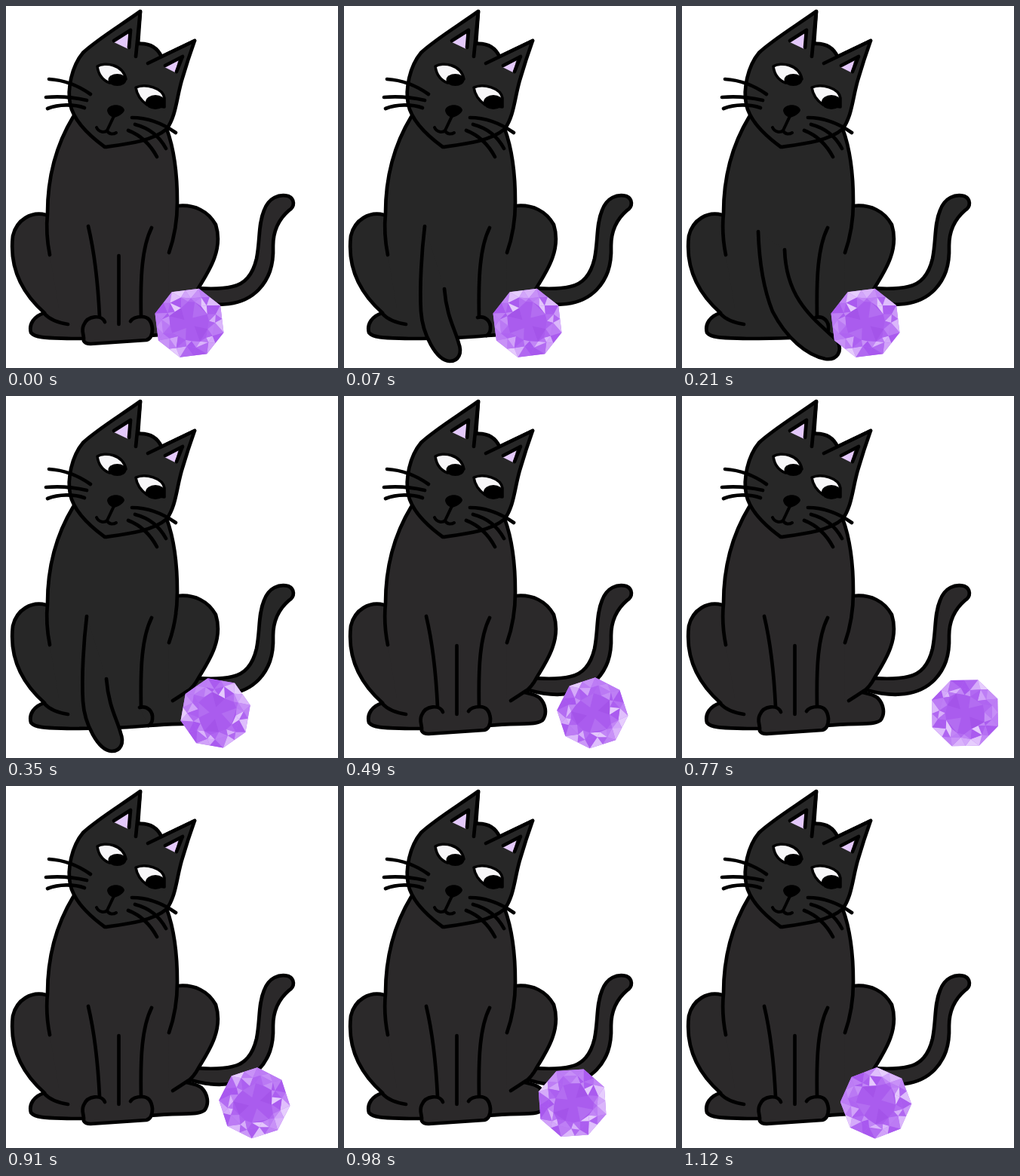
An HTML page for the animation above (1190 ms loop, 440x480 px).

```html
<!DOCTYPE html>
<html lang="en">
<head>
<meta charset="utf-8">
<title>Cat and gem</title>
<style>
html, body { margin: 0; width: 100%; height: 100%; overflow: hidden; background: #fff; }
svg { display: block; width: 440px; height: 480px; }
#cat { fill: #2b292a; stroke: #000; stroke-width: 4.7; stroke-linecap: round; stroke-linejoin: round; }
#cat.swing { fill: #272727; }
#cat.swing #rest, #cat:not(.swing) #reach { display: none; }
.line { fill: none; }
.flat { stroke: none; }
</style>
</head>
<body>
<svg viewBox="0 0 440 480">
  <g id="cat">
    <!-- tail -->
    <path d="M245 374C262 374 280 377 300 372C320 368 328 352 332 335C337 310 334 290 342 271C348 254 362 249 374 252C383 256 383 266 375 271C360 284 354 300 354 318C355 345 348 362 335 376C314 398 280 400 245 390"/>
    <!-- haunches and feet -->
    <path d="M53 277C34 272 14 283 9 305C5 340 16 376 51 407C37 411 30 422 33 433C39 441 60 440 86 441C130 441 160 440 190 437C235 433 254 437 263 430C270 421 267 408 259 400C254 396 248 395 239 393C246 388 252 380 255 374C270 350 288 322 278 290C268 272 250 263 228 265"/>
    <path class="line" d="M51 408C58 416 70 420 82 422M221 404Q232 397 241 391"/>
    <!-- torso -->
    <path class="flat" d="M90 147C70 180 55 220 55 275C53 295 55 315 58 330L70 400L215 400L216 327C222 310 227 285 227 260C227 225 223 190 213 163Z"/>
    <path class="line" d="M89 147C69 180 55 220 55 275C53 295 55 315 58 330M213 163C223 190 227 225 227 260C227 285 222 310 216 327M193 294C180 320 178 360 179 412"/>
    <g id="rest">
      <path class="line" d="M109 292C118 330 122 370 124 412"/>
      <path d="M131 419C127 409 108 410 103 423C99 431 104 436 103 444Q105 448 112 448L186 443C193 441 194 434 194 428C193 417 188 412 180 412Q169 412 165 418"/>
      <path class="line" d="M149.500 331V422"/>
    </g>
    <g id="reach">
      <path d="M177 413C188 410 195 419 194 428Q194 434 189 437"/>
      <path id="leg"/>
    </g>
    <!-- head -->
    <path fill="#272727" d="M178 7C150 27 120 45 102 62C87 80 81 110 85 130C89 150 105 168 131 187C160 183 195 179 213 163C226 145 226 120 234 95C239 78 245 60 250 46L206 67C200 54 190 49 175 50Z"/>
    <path class="line" d="M178 7L172 67M250 46L188 76"/>
    <path class="flat" fill="#e4c9fb" d="M143 48L162 36L162 57ZM210 81L229 70L224 88Z"/>
    <path class="line" d="M143 46L165 32L163 55M211 79L234 67L226 87"/>
    <!-- face -->
    <path fill="#f7f6f8" stroke-width="3.500" d="M121 80C131 74 155 77 159 97L137 102Q123 96 121 80ZM172 108C185 102 208 109 210 122L210 134L187 131Q174 122 172 108Z"/>
    <g fill="#000" class="flat">
      <ellipse cx="147.500" cy="98" rx="12" ry="8"/>
      <ellipse cx="198" cy="127.500" rx="13" ry="9.500"/>
      <path d="M134 138C136 129 155 129 157 138C156 143 148 147 143 148C138 147 134 142 134 138Z"/>
    </g>
    <path class="line" stroke-width="4" d="M143 146L134 165M120 161C123 168 131 168 134 165C136 171 143 170 146 168"/>
    <path class="line" d="M57 97C75 98 95 105 112 117M53 121C75 119 90 121 107 125M55 136C70 130 90 130 104 135M167 148C185 148 205 154 225 168M171 157C190 162 203 172 212 189M162 165C180 172 192 185 200 200"/>
  </g>
  <g id="gem"></g>
</svg>
<script>
const $ = id => document.getElementById(id);
const STEP = 70, STEPS = 17;
const HIT = 3, FAR = 10; // steps at which the gem is struck and turns back

const hanging = 'M107 292C103 325 100 372 102 405C104 435 122 470 140 471C152 471 157 460 152 447C147 428 136 412 133 375';
const stretched = 'M101 299C102 330 106 370 120 405C138 440 165 463 190 468C206 470 213 458 206 444C175 415 138 390 136 323';

// Blend two paths of the same structure
function blend(a, b, t) {
  const ends = b.match(/\d+/g);
  let i = 0;
  return a.replace(/\d+/g, n => +n + (ends[i++] - n) * t);
}

let seed = 11;
const random = () => (seed = seed * 16807 % 2147483647) / 2147483647;

function buildGem() {
  const point = (r, deg, jitter = 0) => {
    const a = (deg + (random() - .5) * jitter) * Math.PI / 180;
    const d = r + (random() - .5) * jitter;
    return [d * Math.cos(a), d * Math.sin(a)];
  };
  const ring = (n, r, jitter, start) => Array.from({ length: n }, (_, i) => point(r, start + i * 360 / n, jitter));
  const poly = (points, fill) => `<polygon points="${points.map(p => p.map(v => v.toFixed(1))).join(' ')}" fill="${fill}"/>`;
  // Mostly violet, now and then almost white
  const shade = () => {
    const light = random() ** 1.6;
    return `hsl(272 ${82 + light * 10}% ${64 + light * 26}%)`;
  };

  const edge = ring(8, 47.2, 0, 22.5);
  const rim = edge.flatMap((p, i) => {
    const q = edge[(i + 1) % 8];
    return [p, [(p[0] + q[0]) / 2, (p[1] + q[1]) / 2]];
  });
  const middle = ring(16, 35, 8, 33);
  const inner = ring(16, 26, 7, 22.5);
  let out = poly(edge, '#b472f1');
  for (let i = 0; i < 16; i++) {
    const j = (i + 1) % 16;
    out += poly([rim[i], rim[j], middle[i]], shade())
      + poly([middle[i], rim[j], middle[j]], shade())
      + poly([middle[i], middle[j], inner[j]], shade())
      + poly([inner[i], inner[j], middle[i]], shade());
  }
  out += poly(inner, '#aa5cee');
  for (let i = 0; i < 16; i += 4) {
    out += poly([inner[i], inner[i + 2], point(8, i * 22.5 + 40)], i % 8 ? '#b36df1' : '#a454e9');
  }
  $('gem').innerHTML = out;
}

// Half linear, half sine
const ease = u => (u + (1 - Math.cos(Math.PI * u)) / 2) / 2;

function draw(time) {
  const step = Math.floor(time / STEP) % STEPS;

  // The paw swings for two steps either side of the hit
  const reach = 1 - Math.abs(step - HIT) / 2;
  $('cat').classList.toggle('swing', reach >= 0);
  $('leg').setAttribute('d', blend(hanging, stretched, Math.max(0, reach)));

  // The gem rolls away and back at the same pace
  const away = Math.max(0, 1 - Math.abs(step - FAR) / (FAR - HIT));
  $('gem').setAttribute('transform', `translate(${243 + 146 * ease(away)} 420.3) rotate(${217 * away - 187})`);
}

buildGem();
const start = performance.now();
function tick() {
  draw(performance.now() - start);
  requestAnimationFrame(tick);
}
tick();
</script>
</body>
</html>
```
